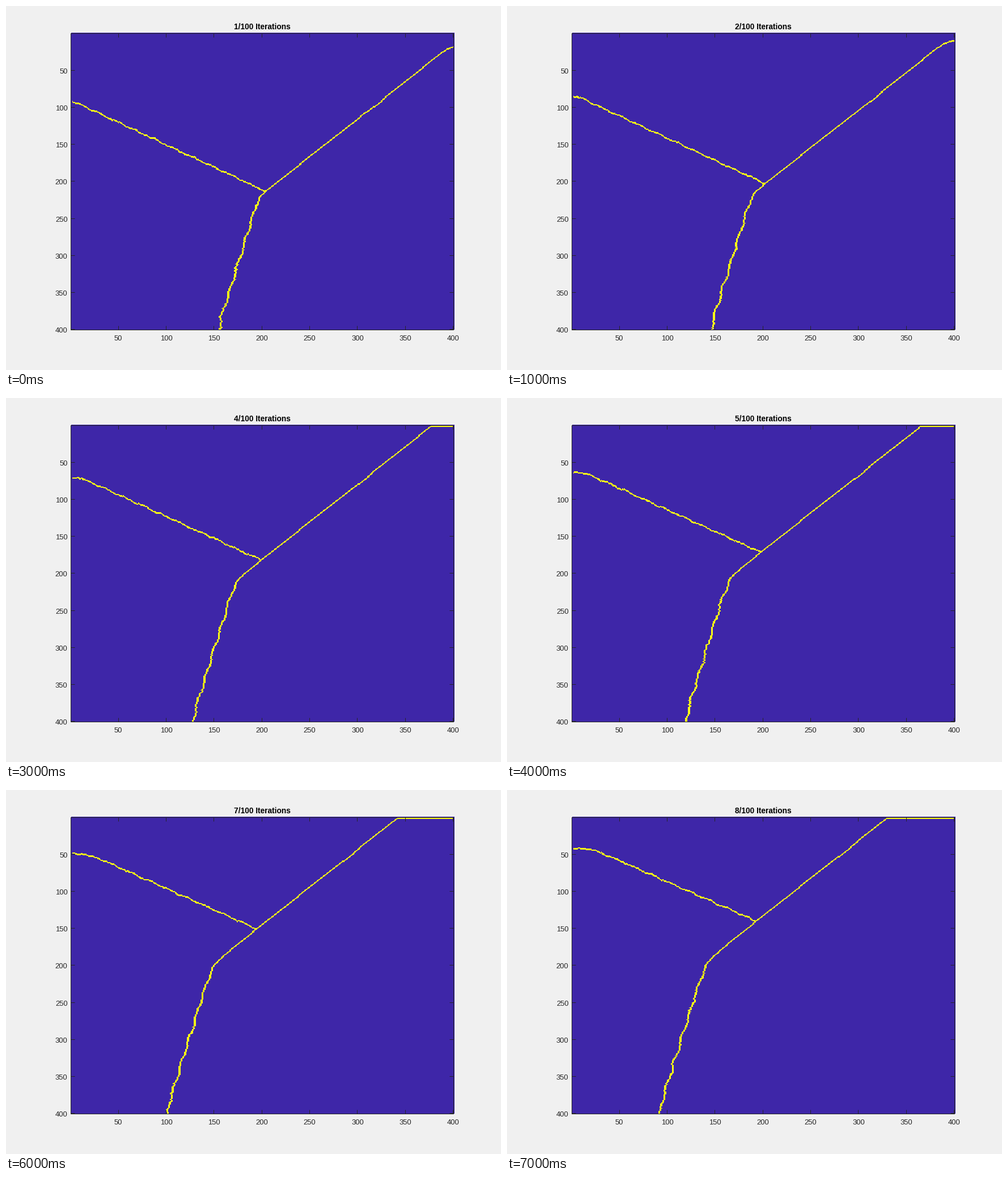
Animation, 873 px wide and 641 px high, one loop 8 s. Source, as a matplotlib script:

```python
import numpy as np
import matplotlib.pyplot as plt
from matplotlib.animation import FuncAnimation
from matplotlib.colors import ListedColormap
from matplotlib.patches import Rectangle

W, H, DPI = 873, 641, 100
LEFT, RIGHT, TOP, BOTTOM = 114.5, 789.5, 48.5, 570.5
N = 400
STEPS = 8
INK = "#262626"
TICK = 7
PX = 72 / DPI

plt.rcParams["font.family"] = "Liberation Sans"
cell_w, cell_h = (RIGHT - LEFT) / N, (BOTTOM - TOP) / N
cx = LEFT + (np.arange(N) + 0.5) * cell_w
cy = TOP + (np.arange(N) + 0.5) * cell_h


def smooth_max(a, b, soft):
    return (a + b + np.hypot(a - b, soft)) / 2


def wave(t, crest, period):
    return np.cos(2 * np.pi * (t - crest) / period)


def jitter(rng, size):
    """Noise held over pairs of cells."""
    return np.repeat(rng.normal(0, size, N // 2), 2)


def arm(k, rng):
    """Height of the left border over x: a rising line, level at the wall."""
    slope = 0.468 - 0.0035 * k
    line = 205 - 11.57 * k + slope * (cx - 195) + wave(cx, 312 + 4 * k, 33)
    return smooth_max(line, 170 - 9.6 * k, 1 + k) + jitter(rng, 0.5)


def diagonal(y, k):
    return 810 - 20 * k - (y - 50) / 0.785


def leg(k, rng):
    """x of the lower border over y, bending upright near the bottom."""
    line = 394 - 15.2 * k + 0.31 * (500 - cy)
    foot = 4 * (np.maximum(cy - 540, 0) / 30) ** 2
    return line + foot + 1.8 * wave(cy, 392 - 3 * k, 43) + jitter(rng, 0.6)


def right_edge(k, rng):
    """x of the right region's border on every row, and that region's top."""
    limit = TOP + 2 * cell_h
    end = 72.8 - 10.8 * k
    top = max(end, limit)
    curl = RIGHT - diagonal(end, k) if end > limit else 0

    diag = diagonal(cy, k)
    diag += 3 * np.exp(-((cy - 173 + 9 * k) / 9) ** 2)
    diag += curl * np.exp(-np.maximum(cy - top, 0) / 3.5)
    return smooth_max(diag, leg(k, rng), 6 + 1.3 * k), top


def border_mask(k):
    """Cells that touch a cell of another region."""
    rng = np.random.default_rng(20 + k)
    region = (cy[:, None] > arm(k, rng)).astype(int)
    edge, top = right_edge(k, rng)
    region[(cx > edge[:, None]) & (cy[:, None] > top)] = 2

    mask = np.zeros((N, N), bool)
    down = region[1:] != region[:-1]
    across = region[:, 1:] != region[:, :-1]
    mask[1:] |= down
    mask[:-1] |= down
    mask[:, 1:] |= across
    mask[:, :-1] |= across
    mask[:, [0, -1]] = False
    return mask


fig = plt.figure(figsize=((W + 0.01) / DPI, (H + 0.01) / DPI), dpi=DPI, facecolor="#f0f0f0")
ax = fig.add_axes([0, 0, 1, 1])
ax.axis("off")

image = ax.imshow(np.zeros((N, N)), cmap=ListedColormap(["#3e26a8", "#f9fb15"]),
                  vmin=0, vmax=1, interpolation="nearest", aspect="auto",
                  extent=(LEFT, RIGHT, BOTTOM, TOP))
ax.set_xlim(0, W)
ax.set_ylim(H, 0)


def line(x0, y0, x1, y1):
    ax.plot([x0, x1], [y0, y1], color=INK, lw=PX, solid_capstyle="butt", snap=False)


def label(x, y, text, ha, **style):
    style = {"fontsize": 13 * PX, "color": INK, **style}
    return ax.text(x, y, text, ha=ha, va="baseline", **style)


ax.add_patch(Rectangle((LEFT, TOP), RIGHT - LEFT, BOTTOM - TOP,
                       fill=False, ec=INK, lw=PX, zorder=3, snap=False))
for v in range(50, N + 1, 50):
    x = LEFT + (v - 0.5) * cell_w
    y = TOP + (v - 0.5) * cell_h
    label(x, 588.5, str(v), "center")
    label(108.5, y + 5.5, str(v), "right")
    x, y = np.floor(x) + 0.5, np.floor(y) + 0.5
    line(x, BOTTOM, x, BOTTOM - TICK)
    line(x, TOP, x, TOP + TICK)
    line(LEFT, y, LEFT + TICK, y)
    line(RIGHT, y, RIGHT - TICK, y)

title = label(452, 41, "", "center", fontsize=13.7 * PX, fontweight="bold", color="black")
masks = [border_mask(k) for k in range(STEPS)]


def draw(k):
    image.set_data(masks[k].astype(float))
    title.set_text(f"{k + 1}/100 Iterations")
    return image, title


anim = FuncAnimation(fig, draw, frames=STEPS, interval=1000, repeat=True, repeat_delay=0)
plt.show()
```
